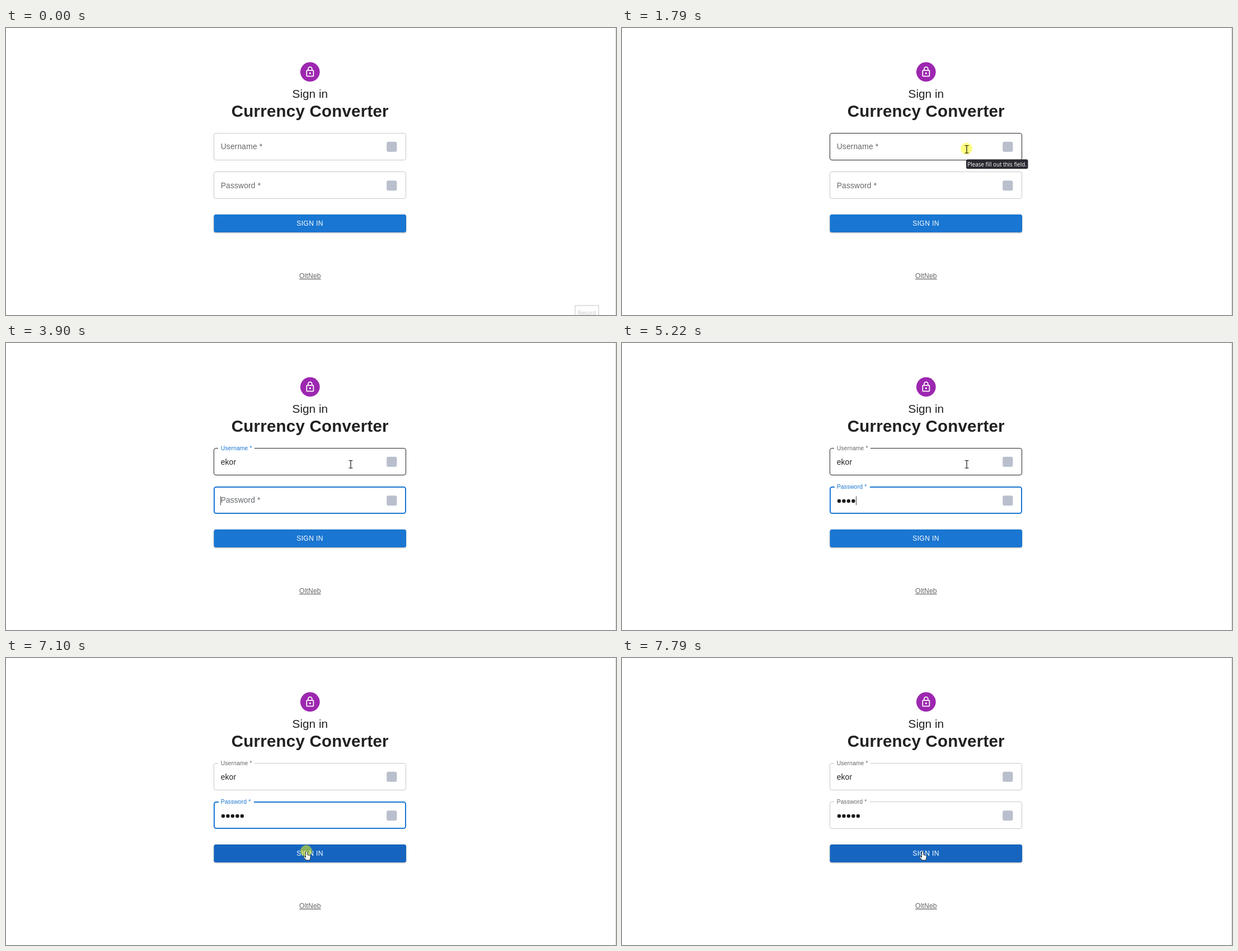
These frames come from a looping animation (1090x514 px, 8 s). An HTML page:

```html
<!DOCTYPE html>
<html lang="en">
<head>
<meta charset="utf-8">
<title>Sign in</title>
<style>
  html, body { margin: 0; width: 100%; height: 100%; overflow: hidden; background: #fff; }
  svg { display: block; }
  text { font-family: "Liberation Sans", Arial, sans-serif; fill: #212121; white-space: pre; }
  .body { font-size: 13.89px; letter-spacing: .00938em; }
  .small { font-family: "Open Sans", "Noto Sans", sans-serif; font-size: 9.9px; }
</style>
</head>
<body>
<svg id="stage" width="1090" height="514" viewBox="0 0 1090 514">
  <defs>
    <clipPath id="buttonClip"><rect x="371.5" y="334" width="343.5" height="32" rx="3.5"/></clipPath>
  </defs>
  <rect x="1089" width="1" height="514" fill="#d4d4d4"/>

  <circle cx="543.3" cy="78.7" r="17.4" fill="#9c27b0"/>
  <g transform="translate(532.9 68.1) scale(.868)" fill="none" stroke="#fff" stroke-width="2">
    <rect x="5" y="9" width="14" height="12" rx="1"/>
    <path d="M8 9V6a4 4 0 0 1 8 0v3"/>
    <circle cx="12" cy="15" r="2" fill="#fff" stroke="none"/>
  </g>
  <text x="511.5" y="124.6" font-size="20.83">Sign in</text>
  <text x="402.8" y="159" font-size="29.5" font-weight="700" letter-spacing=".217">Currency Converter</text>

  <g id="fields"></g>

  <rect id="button" x="371.5" y="334" width="343.5" height="32" rx="3.5"/>
  <g clip-path="url(#buttonClip)"><circle id="ripple" cx="537" cy="347" fill="#fff"/></g>
  <text x="519.2" y="354.3" font-size="12.15" letter-spacing=".347" style="fill:#fff">SIGN IN</text>
  <text x="524.1" y="448" font-size="12.15" letter-spacing=".13" text-decoration="underline" style="fill:#666">OltNeb</text>

  <g id="record">
    <rect x="1017" y="497" width="42" height="30" fill="#fff" stroke="#d2d2d2" stroke-width="1.3"/>
    <text class="small" x="1021.8" y="513.8" style="fill:#c4c4c4">Record</text>
  </g>
  <g id="tip">
    <rect x="615" y="235.3" width="110.5" height="17" rx="3" fill="#2b2a33"/>
    <text class="small" x="617.3" y="247.7" style="fill:#fff">Please fill out this field.</text>
  </g>

  <g id="cursor">
    <circle id="glow" cx="-.5" cy="-1" r="10.4" fill="#ff0" fill-opacity=".5"/>
    <path id="arrow" d="M0 0V12L2.8 9.4 4.7 13.7 6.5 12.9 4.7 8.7H8.6Z" fill="#fff" stroke="#000" stroke-width=".8"/>
    <path id="beam" d="M-3.5-6.5H-1Q0-6.5 0-5.5Q0-6.5 1-6.5H3.5M0-5.5V6M-3.5 7H-1Q0 7 0 6Q0 7 1 7H3.5" fill="none" stroke="#111" stroke-width="1.2"/>
    <path id="hand" d="M-1.5 1A1.5 1.5 0 0 1 1.5 1V6L5.5 7Q7.5 7.6 7.2 9.6L6 15.5H-1L-5 10.3Q-5.4 8.2-3.6 8.8L-1.5 10.8Z" fill="#fff" stroke="#222" stroke-width=".9"/>
  </g>
</svg>
<script>
const LOOP = 8000, BLUE = [25, 118, 210], GRAY = [102, 102, 102];
const $ = id => document.getElementById(id);
const clamp = p => Math.max(0, Math.min(1, p));
const lerp = (a, b, p) => a + (b - a) * p;
const mix = (a, b, p) => `rgb(${a.map((v, i) => Math.round(lerp(v, b[i], p)))})`;
const within = (t, spans) => spans.some(([a, b]) => t >= a && t < b);
const show = (el, on) => el.setAttribute('visibility', on ? 'visible' : 'hidden');
const set = (el, attrs) => { for (const k in attrs) el.setAttribute(k, attrs[k]); };
const smooth = p => p * p * (3 - 2 * p);
const easeOut = p => 1 - (1 - p) ** 3;
const since = (t, start) => t < start ? -1 : Math.floor((t - start) / 68.4) * 68.4 + 2;

// cubic-bezier(0, 0, .2, 1)
function decelerate(x) {
  let lo = 0, hi = 1;
  for (let i = 0; i < 20; i++) {
    const m = (lo + hi) / 2;
    if (.6 * m * m + .4 * m ** 3 < x) lo = m; else hi = m;
  }
  return smooth(hi);
}

function add(parent, tag, attrs, text) {
  const el = document.createElementNS('http://www.w3.org/2000/svg', tag);
  set(el, attrs);
  if (text) el.textContent = text;
  return parent.appendChild(el);
}

const fields = [
  { label: 'Username *', top: 188, notch: 65, focus: [1860, 3900], value: 'ekor',
    keys: [2930, 3100, 3170, 3380], caretOn: [[1860, 2330], [2930, 3640]], caretX: [383, 391, 399, 406, 411] },
  { label: 'Password *', top: 257, notch: 63, focus: [3900, 7170],
    keys: [4690, 4890, 5060, 5220, 5750], caretOn: [[3900, 4360], [4690, 5490], [5750, 6010]],
    caretX: [383, 392, 401, 409, 418, 426] }
];

for (const f of fields) {
  const g = add($('fields'), 'g', {});
  f.mid = f.top + 24.6 + (f.value ? 0 : .5);
  f.border = add(g, 'rect', { fill: '#fff' });
  f.gap = add(g, 'rect', { y: f.top - 1, height: 4, fill: '#fff' });
  add(g, 'rect', { x: 680.2, y: f.mid - 8.8, width: 18.2, height: 18, rx: 3, fill: '#b9bfcc' });
  f.text = add(g, 'text', { class: 'body', x: 383.7, y: f.mid + 5 });
  f.dots = f.value ? [] : f.keys.map((_, i) =>
    add(g, 'circle', { cx: 388 + 8.45 * i, cy: 283, r: 3.25, fill: '#1c1c1c' }));
  f.name = add(g, 'text', { class: 'body' }, f.label);
  f.caret = add(g, 'rect', { y: f.mid - 7.6, width: 1, height: 16, fill: '#444' });
}

function pointer(t) {
  if (t < 6270) {
    const p = smooth(Math.min(11, Math.floor((t - 520) / 68.1)) / 11);
    return [lerp(1022, 616, p), lerp(500, 217, p)];
  }
  const p = easeOut(Math.min(10, Math.floor((t - 6270) / 69.9) + 1) / 10);
  return [lerp(616, 537, p), lerp(217, 346.5, p)];
}

function drawField(f, t, hover) {
  const [on, off] = f.focus;
  const focused = t >= on && t < off;
  const inset = focused ? 1 : .5;
  const up = since(t, on), down = since(t, off);
  set(f.border, {
    x: 371 + inset, y: f.top + inset, width: 344 - 2 * inset, height: 49 - 2 * inset, rx: 3.5,
    stroke: focused ? mix(BLUE, BLUE, 0) : hover ? '#212121' : '#c8c8c8',
    'stroke-width': focused ? 2 : 1
  });
  const lift = decelerate(clamp(up / 200));
  const tint = lift * (1 - decelerate(clamp((down - 2) / 200)));
  set(f.name, {
    transform: `translate(383.7 ${lerp(f.mid + 4.5, f.mid - 20.9, lift)}) scale(${lerp(1, .75, lift)})`,
    style: `fill:${mix(GRAY, BLUE, tint)}`
  });
  set(f.gap, { x: focused ? 380 : 379, width: f.notch * easeOut(clamp((up - 50) / 100)) });

  const count = f.keys.filter(k => t >= k).length;
  if (f.value) f.text.textContent = f.value.slice(0, count);
  f.dots.forEach((d, i) => show(d, i < count));
  f.caret.setAttribute('x', f.caretX[count]);
  show(f.caret, within(t, f.caretOn));
}

function drawButton(t) {
  const h = smooth(clamp(since(t, 6610) / 250));
  const layer = (y, blur, spread, a) => `0 ${y * .868}px ${blur * .868}px ${spread * .868}px rgba(0,0,0,${a})`;
  const drop = (y, blur, a) => `drop-shadow(0 ${y}px ${blur}px rgba(0,0,0,${a}))`;
  $('button').setAttribute('fill', mix(BLUE, [21, 101, 192], h));
  $('button').style.filter = drop(lerp(1.3, 1.8, h), lerp(.8, 1.3, h), .26) + drop(.5, lerp(1.5, 2.2, h), .12);

  const age = since(t, 7135);
  const grow = smooth(clamp(age / 550));
  const fade = 1 - smooth(clamp((age - 100) / 550));
  set($('ripple'), { r: 180 * grow, opacity: age < 0 ? 0 : lerp(.1, .3, grow) * fade });
}

function drawPointer(t, x, y, over, onButton) {
  show($('cursor'), t >= 520);
  $('cursor').setAttribute('transform', `translate(${x} ${y})`);
  const kind = over >= 0 ? 'beam' : onButton ? 'hand' : 'arrow';
  for (const id of ['arrow', 'beam', 'hand'])
    $(id).style.display = id === kind ? 'inline' : 'none';
  $('glow').style.display = within(t, [[1790, 1930], [7100, 7240]]) ? 'inline' : 'none';
}

function render(t) {
  const [x, y] = pointer(t);
  const inX = t >= 520 && x >= 371 && x < 715;
  const over = fields.findIndex(f => inX && y >= f.top && y < f.top + 49);
  fields.forEach((f, i) => drawField(f, t, i === over));
  drawButton(t);
  drawPointer(t, x, y, over, inX && y >= 334 && y < 366);
  show($('record'), t < 70);
  show($('tip'), within(t, [[1790, 1860]]));
}

const begin = performance.now();
function tick() {
  render((performance.now() - begin) % LOOP);
  requestAnimationFrame(tick);
}
tick();
</script>
</body>
</html>
```
